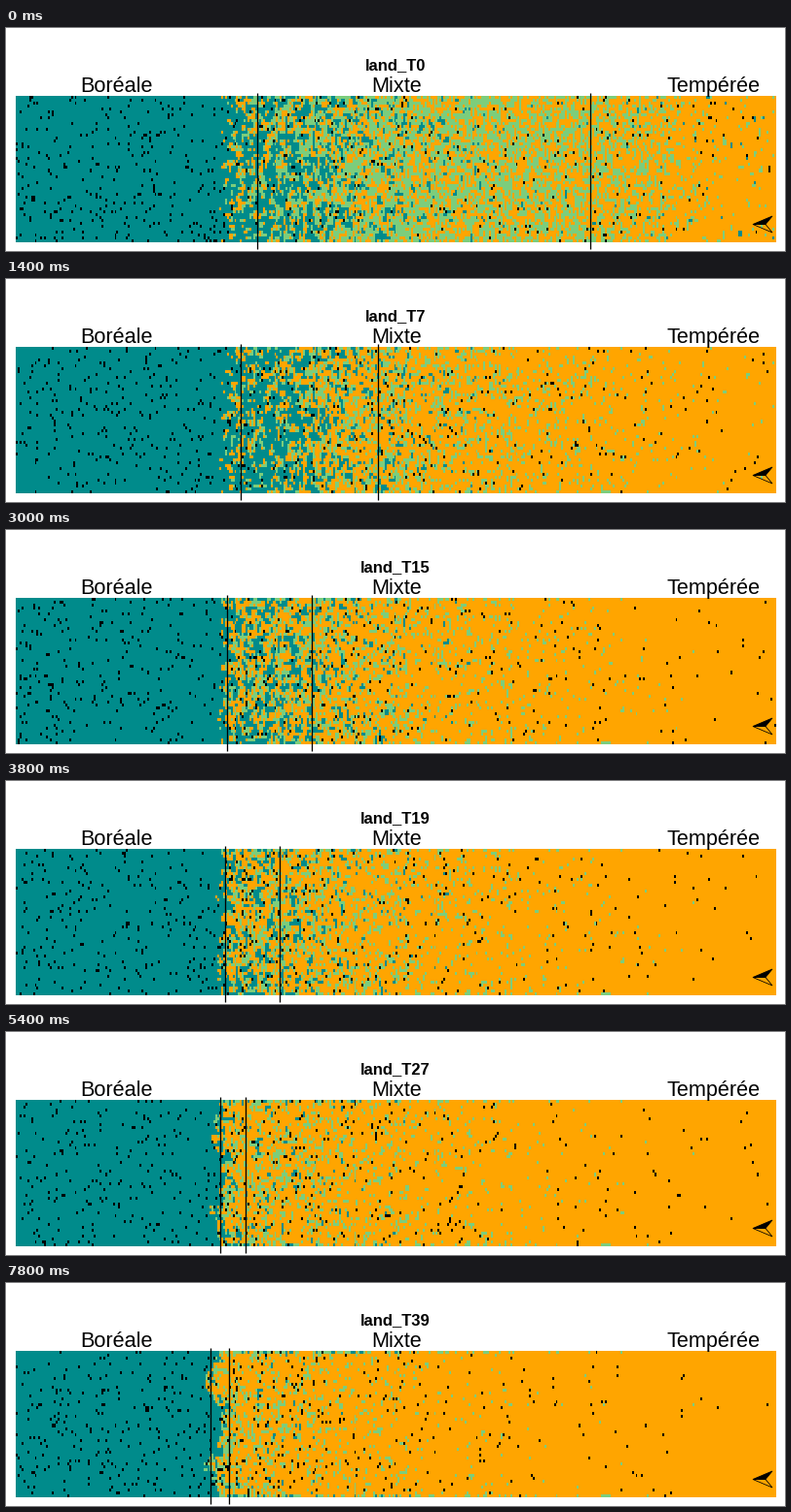
Write a matplotlib script that moves like this. It is 800x230 px and loops after 8 s.

```python
import numpy as np
import matplotlib.pyplot as plt
from matplotlib.animation import FuncAnimation
from matplotlib.colors import to_rgb

W, H, DPI = 800, 230, 80
PX = 72 / DPI
LEFT, RIGHT, TOP, BOTTOM = 10, 791, 70, 221
COLS, ROWS = 400, 50
STEPS, INTERVAL = 40, 200

BOREAL, MIXED, TEMPERATE, BARE = range(4)
COLORS = np.array([to_rgb(c) for c in ("#008B8B", "#7CCD7C", "#FFA500", "#000000")])

# Key years and the position of the two zone limits
YEARS = [0, 7, 11, 15, 23, 31, 39]
LIMIT_WEST = [257, 240, 238, 226, 221, 217, 209]
LIMIT_EAST = [599, 381, 363, 313, 247, 243, 228]

# Share of boreal cells along x, one row per key year
BOREAL_X = [220, 235, 255, 290, 330, 380, 440, 520]
BOREAL_P = np.array([
    [.93, .78, .58, .48, .34, .17, .08, .01],
    [.93, .78, .70, .58, .27, .14, .05, 0],
    [.85, .72, .52, .36, .20, .10, .02, 0],
    [.85, .55, .42, .30, .16, .06, .01, 0],
    [.78, .30, .08, .05, .03, .015, 0, 0],
    [.55, .12, .03, .02, .01, .005, 0, 0],
    [.30, .05, .02, .01, .005, 0, 0, 0],
])

# Share of mixed cells among the others
MIXED_X = [220, 255, 300, 360, 450, 550, 650, 725]
MIXED_P = np.array([
    [.40, .50, .60, .60, .55, .48, .36, .04],
    [.35, .42, .38, .32, .24, .14, .06, .01],
    [.35, .40, .38, .28, .16, .08, .03, 0],
    [.35, .40, .35, .26, .14, .06, .015, 0],
    [.35, .30, .22, .17, .10, .035, .006, 0],
    [.45, .25, .18, .13, .06, .015, .003, 0],
    [.50, .22, .15, .10, .03, .008, .002, 0],
])

# Share of bare cells along x, first and last year
BARE_X = [10, 225, 300, 450, 600, 790]
BARE_P = np.array([
    [.050, .045, .024, .020, .015, .007],
    [.050, .045, .035, .018, .008, .002],
])

xs = LEFT + (np.arange(COLS) + .5) * (RIGHT - LEFT) / COLS
ys = TOP + (np.arange(ROWS) + .5) * (BOTTOM - TOP) / ROWS
rng = np.random.default_rng(12)


def patchy_noise(blend):
    """Uniform noise whose neighbouring cells resemble each other."""
    n = rng.normal(size=(ROWS, COLS))
    near = sum(np.roll(n, s, axis) for s in (-1, 1) for axis in (0, 1))
    ranks = (n + blend * near).ravel().argsort().argsort()
    return ranks.reshape(ROWS, COLS) / n.size


boreal_noise = patchy_noise(.4)
mixed_noise = patchy_noise(.15)
edge_jitter = rng.normal(0, 1.3, ROWS)
border = np.zeros((ROWS, 1))
border[[0, -1]] = 1


def at_year(table, year):
    return [np.interp(year, YEARS, col) for col in table.T]


def bump(center, width):
    return np.exp(-((ys - center) / width) ** 2)


def land(year):
    age = year / (STEPS - 1)
    retreat = 15 * bump(102, 16) + 13 * bump(188, 14) - 3 * bump(140, 18) + 2
    edge = 220 + edge_jitter - age * retreat
    shifted = xs + 220 - edge[:, None]

    p_boreal = np.interp(shifted, BOREAL_X, at_year(BOREAL_P, year))
    p_boreal += border * .18 * age * (xs < 420)
    p_mixed = np.interp(shifted, MIXED_X, at_year(MIXED_P, year))
    p_mixed += border * .35 * age * np.clip((720 - xs) / 400, 0, 1)

    state = np.where(mixed_noise < p_mixed, MIXED, TEMPERATE)
    state[(boreal_noise < p_boreal) | (shifted < 220)] = BOREAL

    p_bare = np.interp(xs, BARE_X, BARE_P[0] + age * (BARE_P[1] - BARE_P[0]))
    draw = np.random.default_rng([5, year]).random((ROWS, COLS))
    state[draw < p_bare] = BARE
    return COLORS[state]


plt.rcParams["font.family"] = "Liberation Sans"
fig = plt.figure(figsize=(W / DPI, H / DPI), dpi=DPI, facecolor="white")
ax = fig.add_axes([0, 0, 1, 1])

img = ax.imshow(land(0), extent=(LEFT, RIGHT, BOTTOM, TOP),
                interpolation="nearest", aspect="auto")
limits = [ax.plot([0, 0], [66.5, 227.5], color="black", lw=1.3 * PX,
                  solid_capstyle="butt")[0] for _ in range(2)]

# North arrow, pointing left
tip, notch = (767, 202.5), (780, 202.5)
for tail, fill in (((787, 194), "black"), ((787, 211), "none")):
    ax.fill(*zip(tip, tail, notch), facecolor=fill, edgecolor="black",
            lw=.8 * PX)

for x, name in ((114, "Boréale"), (401, "Mixte"), (727, "Tempérée")):
    ax.text(x, 66, name, size=21.6 * PX, ha="center", va="baseline")
title = ax.text(400, 43, "", size=16.6 * PX, weight="bold",
                ha="center", va="baseline")

ax.set_xlim(0, W)
ax.set_ylim(H, 0)
ax.axis("off")


def update(year):
    img.set_data(land(year))
    for line, track in zip(limits, (LIMIT_WEST, LIMIT_EAST)):
        x = round(np.interp(year, YEARS, track)) + .5
        line.set_xdata([x, x])
    title.set_text(f"land_T{year}")
    return [img, title, *limits]


anim = FuncAnimation(fig, update, frames=STEPS, interval=INTERVAL, repeat=True)
plt.show()
```
